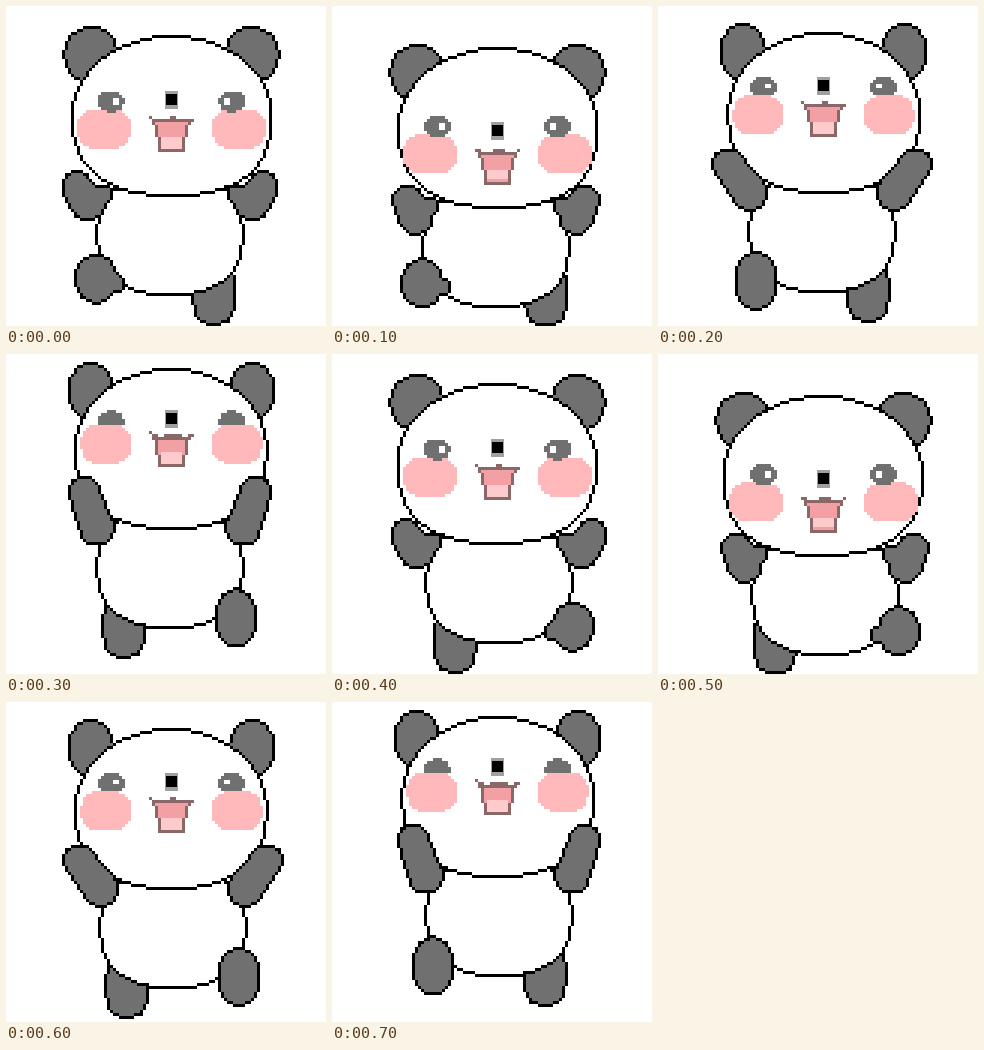
Write an HTML page with a canvas that moves like this. It is 320 px wide and 320 px high and loops after 0.8 s.

```html
<!DOCTYPE html>
<html lang="en">
<head>
<meta charset="utf-8">
<title>Dancing panda</title>
<style>
html, body { margin: 0; width: 100%; height: 100%; overflow: hidden; background: #fff; }
canvas { display: block; width: 100vw; height: 100vh; image-rendering: pixelated; }
</style>
</head>
<body>
<canvas id="stage" width="320" height="320"></canvas>
<script>
const SIZE = 320, CELL = 3, SHIFT = -1, COUNT = 108, STEP = 100;
const MID = 165.5, FLOOR = 320;
const GREY = '#707070', PINK = '#ffb9bb', LIP = '#8a6868', WHITE = '#fff', BLACK = '#000';

// Shapes are tests: is the point (x, y) inside?
const oval = (cx, cy, rx, ry = rx, top = 2, low = top) => (x, y) => {
  const p = y < cy ? top : low;
  return Math.abs((x - cx) / rx) ** p + Math.abs((y - cy) / ry) ** p <= 1;
};
const capsule = (ax, ay, ar, bx, by, br) => (x, y) => {
  const dx = bx - ax, dy = by - ay;
  const along = ((x - ax) * dx + (y - ay) * dy) / (dx * dx + dy * dy);
  const t = Math.min(1, Math.max(0, along));
  return Math.hypot(x - ax - t * dx, y - ay - t * dy) <= ar + t * (br - ar);
};
const join = (...shapes) => (x, y) => shapes.some(s => s(x, y));
const flip = (shape, axis = MID) => (x, y) => shape(2 * axis - x, y);

// x: body centre, base: body bottom, head: head centre, ear: ear centre,
// hand and elbow: left arm, sideways from the body centre
const poses = [
  { x: 164, base: 290, head: 110, wide: 101, ear: 49, hand: [-93, 181], elbow: [-82, 197],
    curled: true, foot: 273, leg: 44, eye: 85, open: 21, nose: 94, mouth: 110 },
  { x: 164, base: 302, head: 122, wide: 101, ear: 67, hand: [-88, 195], elbow: [-80, 211],
    curled: true, foot: 277, leg: 50, eye: 110, open: 21, nose: 125, mouth: 142 },
  { x: 164, base: 287, head: 107, wide: 97, ear: 46, hand: [-94, 158], elbow: [-72, 187],
    foot: 275, leg: 46, eye: 71, open: 18, nose: 80, mouth: 95 },
  { x: 167, base: 275, head: 95, wide: 97, ear: 37, hand: [-86, 138], elbow: [-73, 174],
    foot: 264, leg: 46, eye: 57, open: 13, nose: 65, mouth: 78 }
];

const edge = i => i * CELL + SHIFT;
const snap = v => edge(Math.round((v - SHIFT) / CELL));

// Fill a shape with square cells and a one-cell edge
function blob(ctx, shape, fill, line = fill) {
  const inside = (i, j) => shape(edge(i + .5), edge(j + .5));
  for (let j = 0; j < COUNT; j++) {
    for (let i = 0; i < COUNT; i++) {
      if (!inside(i, j)) continue;
      const core = inside(i - 1, j) && inside(i + 1, j) && inside(i, j - 1) && inside(i, j + 1);
      ctx.fillStyle = core ? fill : line;
      ctx.fillRect(edge(i), edge(j), CELL, CELL);
    }
  }
}

function box(ctx, color, x, y, w, h) {
  ctx.fillStyle = color;
  ctx.fillRect(x, y, w, h);
}

function drawBody(ctx, p, part) {
  const sole = Math.min(FLOOR, p.base + 29);
  part(oval(p.x + p.leg, sole - 32, 22, 32, 3), GREY);
  part(oval(p.x, p.base - 61, 74, 61, 2.4), WHITE);
}

function drawHead(ctx, p, part) {
  const earWide = p.wide - 73;
  const ear = oval(166 - p.wide - 8 + earWide, p.ear, earWide, 29);
  part(join(ear, flip(ear)), GREY);
  part(oval(166, p.head, p.wide, 81, 2, 2.4), WHITE);
}

function drawLimbs(ctx, p, part) {
  const [hx, hy] = p.hand, [ex, ey] = p.elbow;
  const arm = join(
    capsule(p.x + hx, hy, 16.5, p.x + ex, ey, 18.5),
    oval(p.x - 66, p.head + 78, 10.5));
  part(arm, GREY);
  part(flip(arm, p.x), GREY);
  const foot = p.curled
    ? join(oval(p.x - 74, p.foot, 22, 25), oval(p.x - 55, p.foot + 4, 11, 10))
    : oval(p.x - 66, p.foot, 22, 30);
  part(foot, GREY);
}

function drawFace(ctx, p) {
  const left = 172 - p.wide, r = (125 - left) / 2;
  const cheek = oval(left + r, p.eye + Math.min(18, p.open) + 20, r, 20, 2.6);
  const disc = oval(105, p.eye + 10.5, 13, 11);
  const eye = (x, y) => y < p.eye + p.open && disc(x, y);
  blob(ctx, join(cheek, flip(cheek)), PINK);
  blob(ctx, join(eye, flip(eye)), GREY);

  const shine = Math.max(0, p.open - 14);
  box(ctx, WHITE, 107, p.eye + 7, 6, shine);
  box(ctx, WHITE, 218, p.eye + 7, 6, shine);
  box(ctx, '#a0a0a0', 159, p.nose - 9, 13, 18);
  box(ctx, BLACK, 160, p.nose - 6, 11, 11);

  const m = p.mouth;
  const bowl = (x, y) => y > m + 4 && y < m + 36 && Math.abs(x - MID) < 19 - (y - m - 4) * .22;
  const tongue = (x, y) => y > m + 21 && y < m + 32 && Math.abs(x - MID) < 10.5;
  blob(ctx, bowl, '#f2a0a3', LIP);
  blob(ctx, tongue, '#ffcacb');
  for (let x = 143; x < 188; x += CELL) {
    const dip = 4 * Math.abs(Math.sin(Math.PI * (x - 143) / 22.5));
    box(ctx, LIP, snap(x), snap(m + dip), CELL, CELL);
  }
}

function render(p, mirrored) {
  const canvas = document.createElement('canvas');
  canvas.width = canvas.height = SIZE;
  const ctx = canvas.getContext('2d');
  const part = (shape, fill) => blob(ctx, mirrored ? flip(shape) : shape, fill, BLACK);
  box(ctx, WHITE, 0, 0, SIZE, SIZE);
  for (const draw of [drawBody, drawHead, drawLimbs, drawFace]) draw(ctx, p, part);
  return canvas;
}

// Four poses, played twice; the weight is on the other foot for half of the loop
const stage = document.getElementById('stage').getContext('2d');
const views = Array.from({ length: 8 }, (_, i) => render(poses[i % 4], i > 2 && i < 7));
let shown = -1;

function tick() {
  const i = Math.floor(performance.now() / STEP) % views.length;
  if (i !== shown) stage.drawImage(views[shown = i], 0, 0);
  requestAnimationFrame(tick);
}
tick();
</script>
</body>
</html>
```
